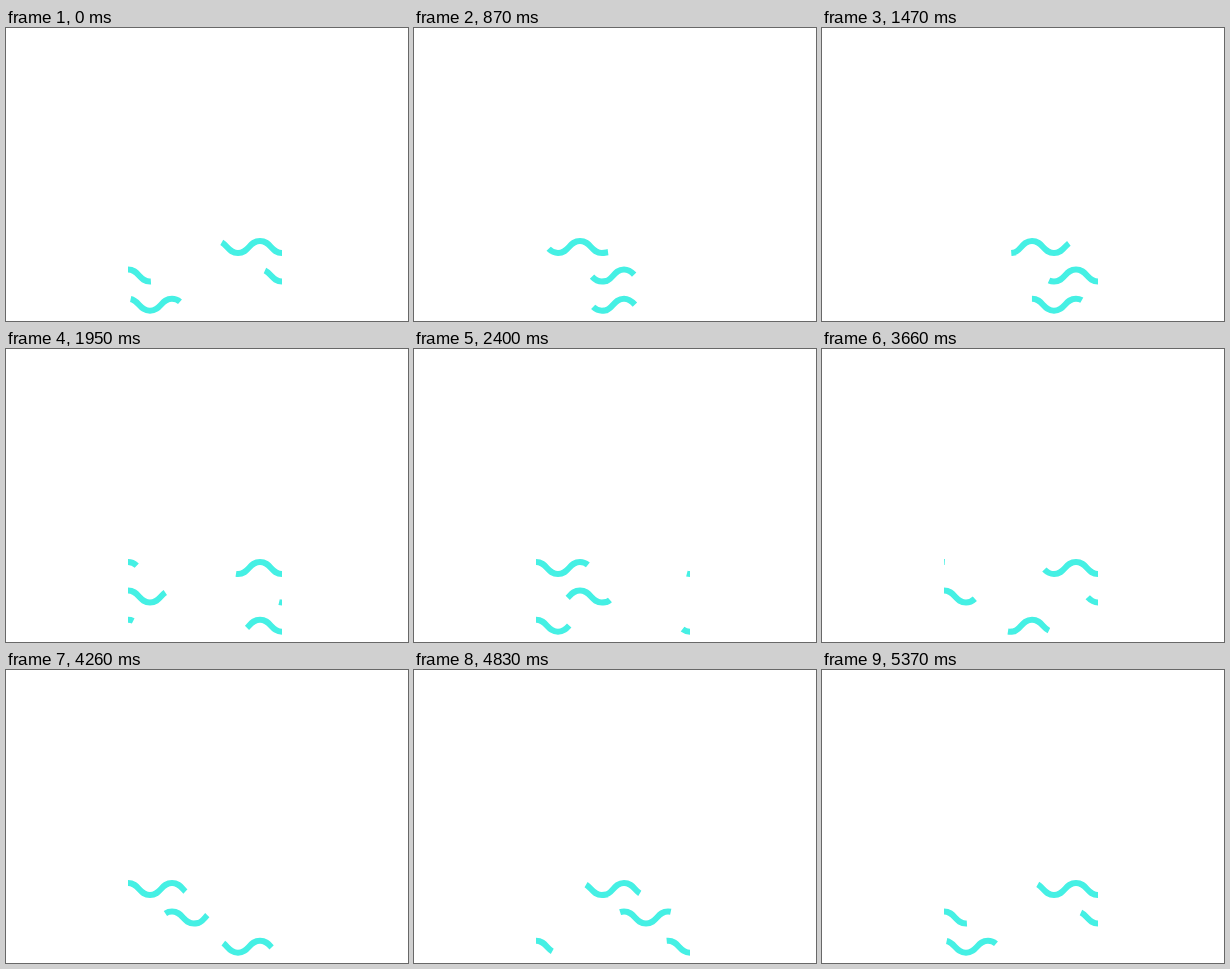
Recreate the animation shown at these times as an HTML page. Size 402x293 px, loop 5400 ms.

```html
<!DOCTYPE html>
<html lang="en">
<head>
<meta charset="utf-8">
<title>Waves</title>
<style>
  html, body { margin: 0; width: 100%; height: 100%; overflow: hidden; background: #fff; }
  svg { display: block; width: 402px; height: 293px; }
  path { fill: none; stroke: #45f0e4; stroke-width: 6; }
</style>
</head>
<body>
<svg viewBox="0 0 402 293">
  <clipPath id="window"><rect x="122" y="205" width="154" height="81"/></clipPath>
  <g id="waves" clip-path="url(#window)"></g>
</svg>
<script>
  const LOOP = 5400, STEP = 30, LAST = LOOP / STEP - 1;
  // Lengths are measured in half waves; the path runs on past the right edge.
  const TOTAL = 7.76;
  const ROWS = [
    { y: 213, start: 4.58, dash: 2.86, turns: 3 },
    { y: 241.5, start: 6.54, dash: 2.25, turns: 3 },
    { y: 270.7, start: 0.1, dash: 2.23, turns: 2 }
  ];

  const down = 'c11 0 11 12 22 12', up = 'c11 0 11 -12 22 -12';

  // Two joined pieces: the first overshoots the trough a little and doubles back.
  const wavePath = y =>
    `M122 ${y}${down}${up}${down}l6 -.7l-4.5 .7c9.5 0 9.5 -12 20.5 -12${down}${up}${down}h10.8`;

  const group = document.getElementById('waves');
  const waves = ROWS.map(row => {
    const path = document.createElementNS('http://www.w3.org/2000/svg', 'path');
    path.setAttribute('d', wavePath(row.y));
    path.setAttribute('pathLength', TOTAL);
    path.setAttribute('stroke-dasharray', `${row.dash} ${TOTAL - row.dash}`);
    group.append(path);
    return { ...row, path };
  });

  const origin = performance.now();

  function draw() {
    const time = (performance.now() - origin) % LOOP;
    const progress = Math.floor(time / STEP) / LAST;
    for (const { path, start, turns } of waves) {
      const head = (start + progress * turns * TOTAL) % TOTAL;
      path.setAttribute('stroke-dashoffset', -head);
    }
    requestAnimationFrame(draw);
  }
  draw();
</script>
</body>
</html>
```
